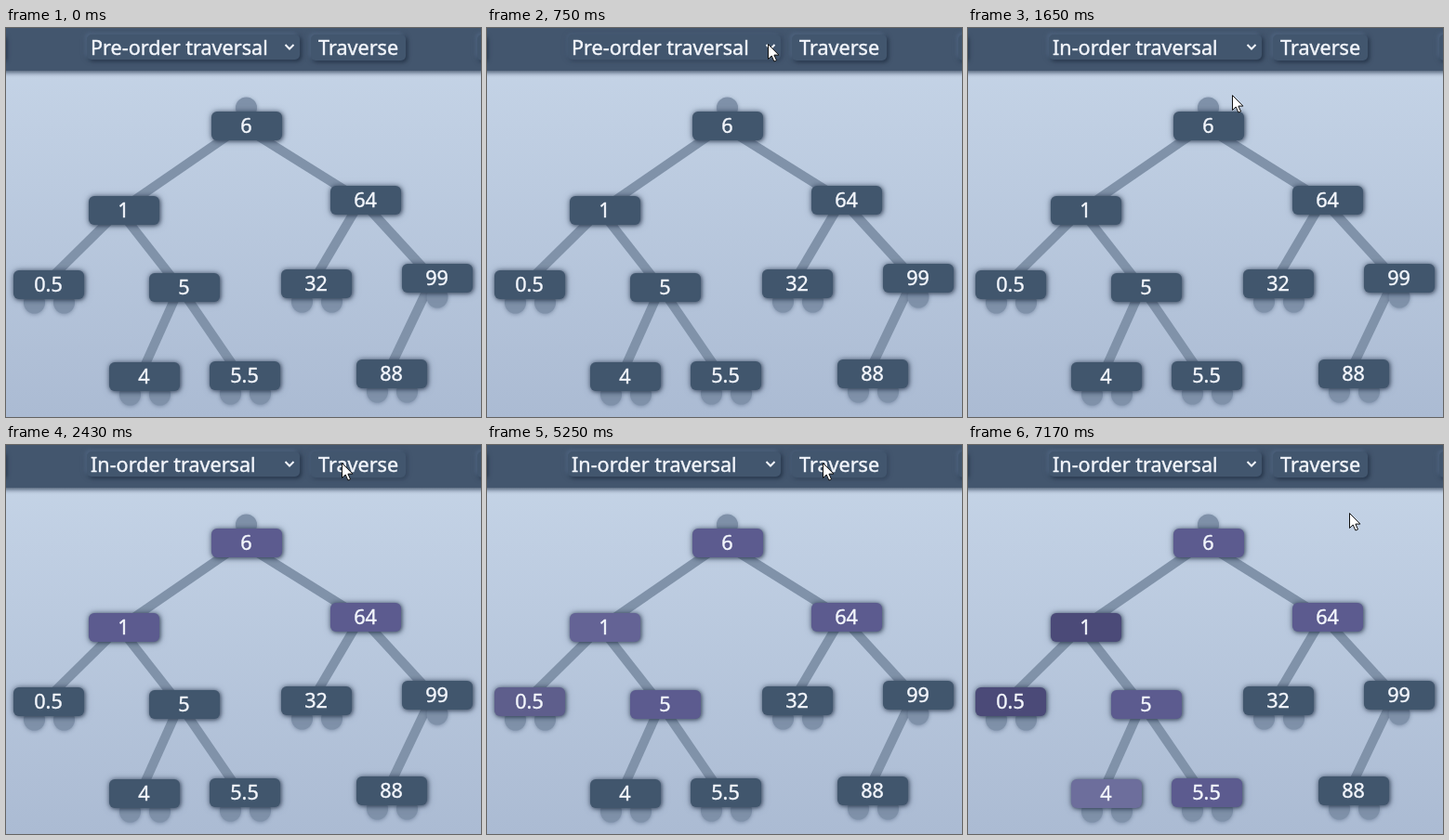
An HTML page for the animation above (8000 ms loop, 511 px wide and 419 px high).

```html
<!DOCTYPE html>
<html lang="en">
<head>
<meta charset="utf-8">
<title>Tree traversal</title>
<style>
  html, body { margin: 0; width: 100%; height: 100%; overflow: hidden; background: #b6c5da; }
  svg { display: block; width: 511px; height: 419px; }
  text { font: 21.6px "Noto Sans", "Open Sans", sans-serif; fill: #f3f6fc; stroke: #f3f6fc; stroke-width: .4; }
  #menu text { font-size: 22px; }
  .num { text-anchor: middle; }
  .node { filter: drop-shadow(1px 1px 2px rgba(28, 42, 62, .6)) drop-shadow(0 0 3px rgba(40, 56, 80, .55)); }
  .stub { fill: #7f91a9; filter: drop-shadow(0 1px 2px rgba(50, 68, 95, .4)); }
  .edge { stroke: #8092a9; stroke-width: 10; }
  .button { fill: #42566e; filter: drop-shadow(-2px -2px 2px rgba(92, 116, 148, .55)) drop-shadow(2px 2px 2px rgba(22, 34, 52, .65)); }
  .button.soft { filter: drop-shadow(-1px -1px 2px rgba(92, 116, 148, .5)) drop-shadow(1px 1px 2px rgba(22, 34, 52, .5)); }
  .header { fill: #43566e; filter: drop-shadow(0 2px 2.5px rgba(30, 46, 68, .75)); }
</style>
</head>
<body>
<svg viewBox="0 0 511 419">
  <defs>
    <linearGradient id="sky" x1="0" y1="0" x2="0" y2="1">
      <stop offset=".1" stop-color="#c4d3e6"/>
      <stop offset="1" stop-color="#abbbd3"/>
    </linearGradient>
  </defs>
  <rect width="511" height="419" fill="url(#sky)"/>
  <g id="tree"></g>
  <rect class="header" x="-10" y="-10" width="531" height="56"/>
  <rect class="button" x="-40" y="7" width="39" height="28" rx="5"/>
  <rect class="button" x="507" y="7" width="40" height="28" rx="5"/>
  <rect class="button" id="select" x="87" y="7" width="229" height="27" rx="5"/>
  <text id="choice" x="91" y="29"></text>
  <path d="M300.500 18l4.500 4.500l4.500-4.500" fill="none" stroke="#f3f6fc" stroke-width="2"/>
  <rect class="button" id="run" x="328" y="7" width="102" height="28" rx="5"/>
  <text x="336" y="29">Traverse</text>
  <g id="menu">
    <rect x="87.500" y="33.500" width="228" height="88.500" fill="#42566e" stroke="#65717f"/>
    <rect id="highlight" x="88" width="227" height="28.500" fill="#1e90ff"/>
  </g>
  <path id="cursor" d="M.5.5v16l3.700-3.500l2.700 6l2.600-1.100l-2.600-5.800h5z" fill="#fff" stroke="#111" stroke-linejoin="round"/>
</svg>
<script>
const LOOP = 8000, STEP = 30;
const BASE = [65, 86, 109], QUEUED = [92, 91, 143], ACTIVE = [109, 110, 156], DONE = [75, 74, 120];
const options = ['Pre-order traversal', 'In-order traversal', 'Post-order traversal'];

// label: left, top, changes as [start, duration, colour]
const nodes = {
  '6': [221, 90, [[2310, 90, QUEUED]]],
  '1': [89, 181, [[2310, 90, QUEUED], [5210, 90, ACTIVE], [6270, 90, DONE]]],
  '64': [349, 170, [[2310, 90, QUEUED]]],
  '0.5': [8, 261, [[3270, 90, QUEUED], [4260, 60, ACTIVE], [5210, 90, DONE]]],
  '5': [154, 264, [[3270, 90, QUEUED]]],
  '32': [296, 260, []],
  '99': [426, 254, []],
  '4': [111, 360, [[6270, 90, QUEUED], [7140, 30, ACTIVE]]],
  '5.5': [219, 359, [[6270, 90, QUEUED]]],
  '88': [377, 357, []]
};
const children = { '6': ['1', '64'], '1': ['0.5', '5'], '64': ['32', '99'], '5': ['4', '5.5'], '99': ['88'] };

const linear = p => p;
const easeOut = p => 1 - (1 - p) ** 2;
const smooth = p => p * p * (3 - 2 * p);
// time, x, y, easing towards this point
const path = [
  [180, 493, 104], [540, 312, 20, smooth], [720, 302, 17, easeOut],
  [930, 302, 17, linear], [1230, 288, 62, linear], [1440, 284, 72, easeOut],
  [1650, 284, 72, linear], [2130, 361, 19, smooth],
  [5970, 361, 19, linear], [6540, 410, 73, smooth]
];

const byId = id => document.getElementById(id);
const mix = (a, b, p) => a.map((v, i) => v + (b[i] - v) * p);
const clamp = p => Math.min(1, Math.max(0, p));

function add(parent, name, attrs, text = '') {
  const el = document.createElementNS('http://www.w3.org/2000/svg', name);
  for (const key in attrs) el.setAttribute(key, attrs[key]);
  el.textContent = text;
  return parent.appendChild(el);
}

const tree = byId('tree'), menu = byId('menu'), cursor = byId('cursor');
const select = byId('select'), run = byId('run'), choice = byId('choice'), highlight = byId('highlight');

const stub = (cx, cy) => add(tree, 'circle', { class: 'stub', cx, cy, r: 11.5 });
// edges run a little left of the box centres
const anchor = label => [nodes[label][0] + 33, nodes[label][1] + 15.5];
for (const parent in children) {
  const [x1, y1] = anchor(parent);
  for (const child of children[parent]) {
    const [x2, y2] = anchor(child);
    add(tree, 'line', { class: 'edge', x1, y1, x2, y2 });
  }
}
stub(258.5, 86);
stub(464, 290);
for (const leaf of ['0.5', '32', '4', '5.5', '88']) {
  const [x, y] = nodes[leaf];
  stub(x + 22.5, y + 35);
  stub(x + 54.5, y + 35);
}
const boxes = Object.entries(nodes).map(([label, [x, y, changes]]) => {
  const box = add(tree, 'rect', { class: 'node', x, y, width: 76, height: 31, rx: 6 });
  add(tree, 'text', { class: 'num', x: x + 37.5, y: y + 23 }, label);
  return { box, changes };
});
options.forEach((label, i) => add(menu, 'text', { x: 93.5, y: 56 + 28 * i }, label));

function cursorAt(t) {
  const i = path.findIndex(point => point[0] > t);
  if (i < 0) return path[path.length - 1].slice(1, 3);
  if (i === 0) return path[0].slice(1, 3);
  const from = path[i - 1], to = path[i];
  const p = to[3]((t - from[0]) / (to[0] - from[0]));
  return mix(from.slice(1, 3), to.slice(1, 3), p);
}

function render(time) {
  const t = Math.floor(time / STEP) * STEP;
  const [x, y] = cursorAt(t);
  const over = (left, right) => t >= 210 && x > left && x < right && y < 35;
  cursor.setAttribute('transform', `translate(${x} ${y})`);
  cursor.style.display = t < 210 ? 'none' : '';

  const open = t >= 780 && t < 1650;
  menu.style.display = open ? '' : 'none';
  highlight.setAttribute('y', y > 62.5 ? 62 : 34);
  choice.textContent = options[t < 1650 ? 0 : 1];
  select.classList.toggle('soft', open || over(87, 311));
  run.classList.toggle('soft', over(328, 430));

  for (const { box, changes } of boxes) {
    const color = changes.reduce((c, [start, span, to]) => mix(c, to, clamp((t - start) / span)), BASE);
    box.setAttribute('fill', `rgb(${color.map(Math.round)})`);
  }
}

const started = performance.now();
function tick() {
  render((performance.now() - started) % LOOP);
  requestAnimationFrame(tick);
}
tick();
</script>
</body>
</html>
```
